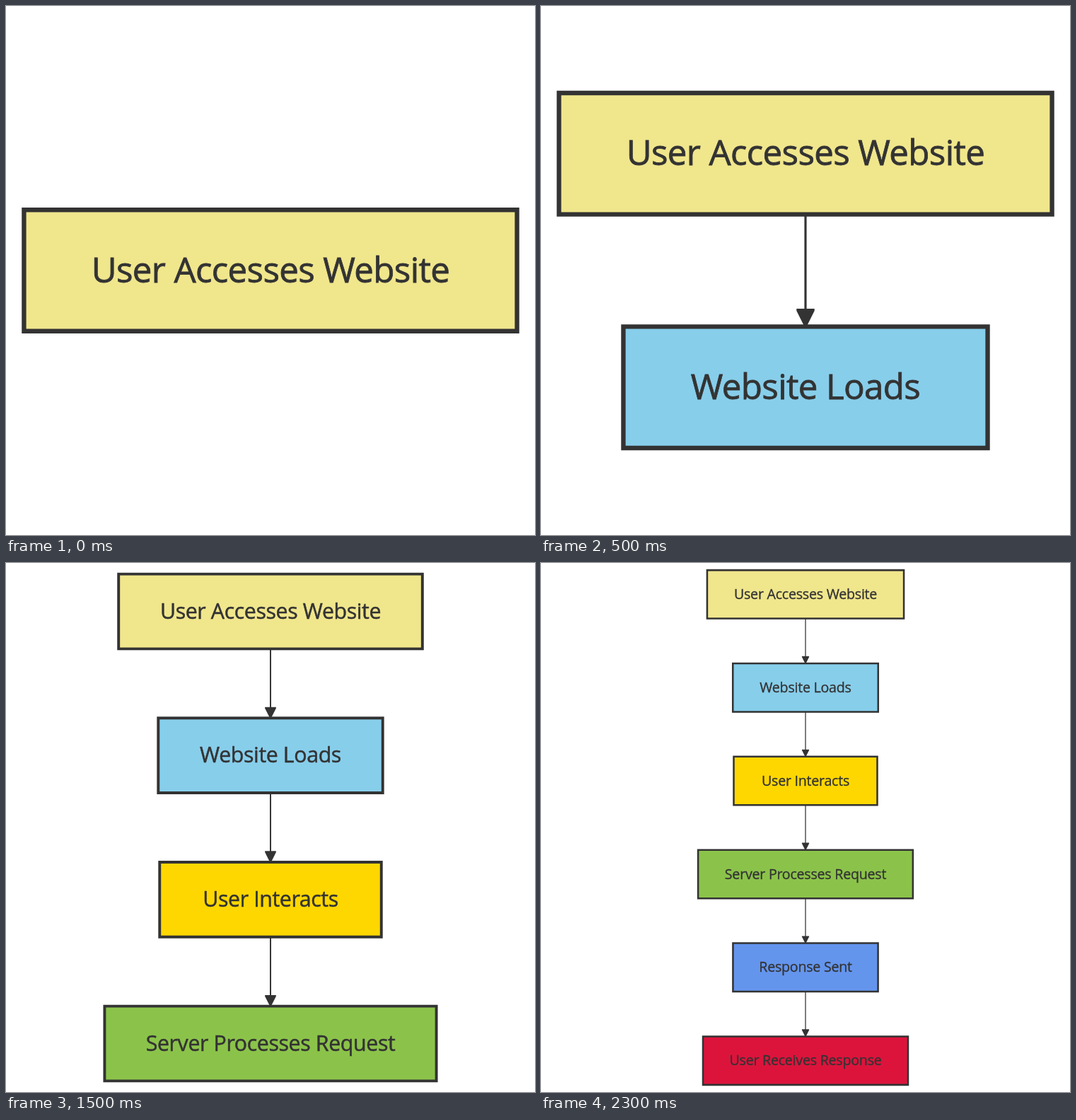
Animation, 748 px wide and 748 px high, one loop 2.5 s. Source, as an HTML page with a canvas:

```html
<!DOCTYPE html>
<html lang="en">
<head>
<meta charset="utf-8">
<title>Website request flow</title>
<style>
  html, body { margin: 0; width: 100%; height: 100%; overflow: hidden; background: #fff; }
  canvas { display: block; }
</style>
</head>
<body>
<canvas id="stage" width="748" height="748"></canvas>
<script>
const SIZE = 748;
const INK = '#333';
const STEP_MS = 500;
const COUNTS = [1, 2, 3, 4, 6]; // boxes visible in each step

// Diagram units; each step is scaled to fit the stage.
const BOX_H = 54, PITCH = 104, MARGIN = 8;
const NODES = [
  { label: 'User Accesses Website', width: 219.4, fill: '#f0e68c' },
  { label: 'Website Loads', width: 162.1, fill: '#87ceeb' },
  { label: 'User Interacts', width: 160.1, fill: '#ffd700' },
  { label: 'Server Processes Request', width: 239.6, fill: '#8bc34a' },
  { label: 'Response Sent', width: 161.8, fill: '#6495ed' },
  { label: 'User Receives Response', width: 228.7, fill: '#dc143c' }
];

const ctx = document.getElementById('stage').getContext('2d');

function drawArrow(from, to) {
  ctx.fillStyle = INK;
  ctx.fillRect(-0.5, from, 1, to - from - 4);
  ctx.beginPath();
  ctx.moveTo(-4, to - 8);
  ctx.lineTo(4, to - 8);
  ctx.lineTo(4, to - 7.1);
  ctx.lineTo(0.45, to);
  ctx.lineTo(-0.45, to);
  ctx.lineTo(-4, to - 7.1);
  ctx.fill();
}

function drawLabel(label, y) {
  ctx.fillStyle = INK;
  ctx.fillText(label, 0, y);
  // A hairline outline gives the letters a slightly firmer weight.
  ctx.lineWidth = 0.25;
  ctx.strokeText(label, 0, y);
}

function drawNode({ label, width, fill }, y) {
  ctx.fillStyle = fill;
  ctx.strokeStyle = INK;
  ctx.lineWidth = 2;
  ctx.beginPath();
  ctx.rect(-width / 2, y - BOX_H / 2, width, BOX_H);
  ctx.fill();
  ctx.stroke();
  drawLabel(label, y + 5.2);
}

function draw(count) {
  const nodes = NODES.slice(0, count);
  const height = BOX_H + (count - 1) * PITCH;
  const width = Math.max(...nodes.map(n => n.width));
  const scale = SIZE / (Math.max(width, height) + 2 * MARGIN);
  const centerY = i => (i - (count - 1) / 2) * PITCH;

  ctx.setTransform(1, 0, 0, 1, 0, 0);
  ctx.fillStyle = '#fff';
  ctx.fillRect(0, 0, SIZE, SIZE);
  ctx.setTransform(scale, 0, 0, scale, SIZE / 2, SIZE / 2);
  ctx.font = '15.5px "Open Sans", "Noto Sans", sans-serif';
  ctx.letterSpacing = '-0.2px';
  ctx.textAlign = 'center';
  ctx.lineJoin = 'miter';

  for (let i = 1; i < count; i++) {
    drawArrow(centerY(i - 1) + BOX_H / 2, centerY(i) - BOX_H / 2);
  }
  nodes.forEach((node, i) => drawNode(node, centerY(i)));
}

function tick() {
  const step = Math.floor(performance.now() / STEP_MS) % COUNTS.length;
  draw(COUNTS[step]);
  requestAnimationFrame(tick);
}
tick();
</script>
</body>
</html>
```
